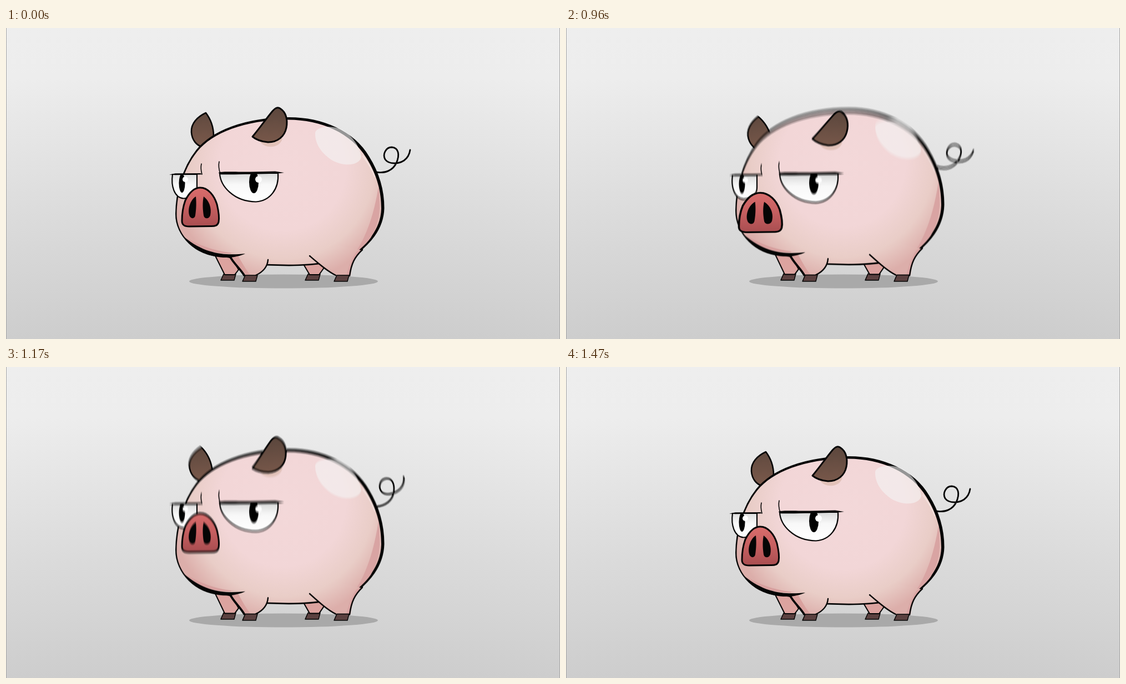
Recreate the animation shown at these times as an HTML page with a canvas. Size 998 by 561 pixels, loop 1800 ms.

```html
<!DOCTYPE html>
<html lang="en">
<head>
<meta charset="utf-8">
<title>Pig hop</title>
<style>
html, body { margin: 0; width: 100%; height: 100%; overflow: hidden; background: #ddd; }
canvas { display: block; width: 998px; height: 561px; }
</style>
</head>
<body>
<canvas id="stage" width="998" height="561"></canvas>
<script>
const W = 998, H = 561, LOOP = 1800, STEP = 30;
const SHUTTER = 15, SAMPLES = 7, GROUND = 457;
const out = document.getElementById('stage').getContext('2d');
const buffer = document.createElement('canvas');
buffer.width = W;
buffer.height = H;
const c = buffer.getContext('2d');

// Key times in ms; each track lists its value at those times (0 once it runs out).
const TIMES = [840, 900, 930, 960, 990, 1050, 1110, 1170, 1230, 1290, 1350, 1410, 1470];
const TRACKS = {
  body:      [0, 14, 7, -14, -33, -46, -36, -13, 8, 6],
  eyes:      [0, 14, 10, 1.5, -9, -28, -34, -17, 9, 5],
  snout:     [0, 6, 10, 10, 3, -24, -36, -24, 4, 4, -5, -3],
  snoutWide: [0, .1, .16, .17, .1],
  earY:      [0, 12, 10, 4, -6, -28, -33, -14, 16, 7],
  earTurn:   [0, -2, 0, 3.4, 7, 11, 8.7, -4, -12, -6],
  farY:      [0, 12, 11, 7, 0, -18, -23.5, -8, 14, 7],
  farTurn:   [0, -5, -9, -13, -18, -27, -26, -8, 6, 3],
  tail:      [0, 2, 6, 10, 10, 6, -10, -14, 4.5, 7]
};

const at = (track, i) => track[i] || 0;

function slope(track, i) {
  if (i < 1 || i >= TIMES.length - 1) return 0;
  const before = at(track, i) - at(track, i - 1);
  const after = at(track, i + 1) - at(track, i);
  return before && after ? (before + after) / (TIMES[i + 1] - TIMES[i - 1]) : 0;
}

function value(track, t) {
  const last = TIMES.length - 1;
  if (t <= TIMES[0] || t >= TIMES[last]) return 0;
  let i = 0;
  while (t >= TIMES[i + 1]) i++;
  const d = TIMES[i + 1] - TIMES[i], u = (t - TIMES[i]) / d, v = 1 - u;
  return v * v * (1 + 2 * u) * at(track, i) + u * u * (3 - 2 * u) * at(track, i + 1)
    + d * u * v * (v * slope(track, i) - u * slope(track, i + 1));
}

function poseAt(t) {
  const pose = {};
  for (const name in TRACKS) pose[name] = value(TRACKS[name], t);
  return pose;
}

function stops(gradient, list) {
  list.forEach(([p, color]) => gradient.addColorStop(p, color));
  return gradient;
}
const fade = (y0, y1, ...list) => stops(c.createLinearGradient(0, y0, 0, y1), list);

const sky = fade(0, H, [0, '#eeeeee'], [.16, '#ededed'], [.61, '#dbdbdb'], [1, '#cdcdcd']);
const skin = stops(c.createRadialGradient(500, 250, 0, 500, 250, 208),
  [[0, '#f3d8d9'], [.55, '#f2d6d7'], [.8, '#e9cdc7'], [1, '#dcaeaa']]);
const earFill = fade(145, 212, [0, '#5c473d'], [1, '#7a594b']);
const eyeFill = fade(262, 312, [0, '#d9d9d9'], [.4, '#f8f8f8'], [1, '#ffffff']);
const snoutFill = fade(287, 359, [0, '#d96d6c'], [.5, '#c65f60'], [1, '#a84d50']);

const path = d => new Path2D(d);
const BODY = path('M307.5 335C308 300 318 255 345 221C372 188 430 163.5 510 163.5' +
  'C570 163.5 625 188 652 233C672 265 679 295 679 325C678 365 650 390 632 405' +
  'C610 420 560 427 510 427L470 426C440 424 410 411 385 410C345 409 307 375 307.5 335Z');
const CHIN = path('M321 377C340 402 370 415 400 414L404 414C415 413 428 409 431 407C400 410 362 411 321 377Z');
const CHIN_SHADE = path('M326 379C350 402 380 410 425 406C390 407 355 395 326 379Z');
const SIDE_SHADE = path('M674 285C679 325 676 350 660 378C650 392 636 402 629 409C640 394 662 360 674 285Z');
const SHINE = path('M557 191C556 178 585 174 605 183C625 195 638 215 640 233C635 250 605 250 585 237C565 223 557 206 557 191Z');
const FRONT_LEG = path('M405 406C412 425 425 437 429 447L450 447C462 441 471 432 472 419L465 402Z');
const FRONT_SHADE = path('M406 413L418 411C426 425 433 437 440 445L429 445C422 433 411 425 406 413Z');
const HIND_LEG = path('M548 411C565 424 580 440 594 447L619 447C622 425 628 412 640 401L600 392Z');
const HIND_SHADE = path('M621 446C623 427 628 412 642 400L632 403C623 415 617 432 613 446Z');
const FAR_FRONT = path('M377 411L394 445L412 445L419 436L405 411Z');
const FAR_HIND = path('M534 423L547 445L564 445L574 431L562 420Z');
const TAIL = path('M667 260C684 263 697 256 703 244C710 228 707 216 695 215C684 215 678 228 683 237' +
  'C690 247 708 245 717 239C724 234 727 227 728 220');
const EAR = path('M444 196C455 183 470 162 480 150C486 143 491 142 495 146C504 152 508 165 505 180' +
  'C502 195 490 206 472 206C460 205 450 201 444 196Z');
const EAR_SHADE = path('M455 201C464 220 494 218 498 199Z');
const FAR_EAR = path('M360 153C345 160 333 172 334 188C335 202 343 211 352 214C362 207 371 200 374 195C374 178 369 165 360 153Z');
const EYE = path('M385 262C386 285 410 313 450 313.5C476 312 492 290 490 262Z');
const FAR_EYE = path('M300 264C297 285 303 306 320 307.5C335 307 344 298 344 287L344 264Z');
const BROW = path('M383 261C385 258 410 259.5 440 259.5L485 258.5L501 261L485 263C450 263 410 265 385 264Z');
const FAR_BROW = path('M294 264.5L305 262.3L351 262L352 264.3L305 265.3Z');
const CREASES = path('M384 241C382 250 384 257 386 263M352 245C350 254 352 259 353 264');
const SNOUT = path('M350 288C364 288 375 302 380 318C384 335 384 345 383 350C381 357 376 357.5 370 357.5' +
  'L330 358C321 358 317 355 317 348C317 335 319 322 323 311C330 297 338 288 350 288Z');
const NOSTRILS = path('M342 304C333 309 327 325 330 337C332 345 340 345 341 338C343 325 343 314 342 304Z' +
  'M356 304C366 311 371 325 368 338C366 345 357 345 356 338C354 325 354 314 356 304Z');

function fill(shape, color) {
  c.fillStyle = color;
  c.fill(shape);
}

function line(shape, width, color = '#050505') {
  c.strokeStyle = color;
  c.lineWidth = width;
  c.stroke(shape);
}

function oval(x, y, rx, ry, color) {
  c.fillStyle = color;
  c.beginPath();
  c.ellipse(x, y, rx, ry, 0, 0, Math.PI * 2);
  c.fill();
}

function group(draw) {
  c.save();
  draw();
  c.restore();
}

function scaleFrom(x, y, sx, sy) {
  c.translate(x, y);
  c.scale(sx, sy);
  c.translate(-x, -y);
}

function turn(x, y, degrees) {
  c.translate(x, y);
  c.rotate(degrees * Math.PI / 180);
  c.translate(-x, -y);
}

function hoof(x, y) {
  const shape = path(`M${x + 4} ${y}h22l-3 11h-24Z`);
  fill(shape, '#5b4140');
  line(shape, 1.5);
}

function leg(shape, color, width) {
  fill(shape, color);
  line(shape, width);
}

function drawEye(shape, brow, x, y, rx, ry, gx, gr) {
  fill(shape, eyeFill);
  group(() => {
    c.clip(shape);
    oval(x, y, rx, ry, '#000');
  });
  oval(gx, 273, gr, gr, '#fff');
  line(shape, 2.2);
  fill(brow, '#050505');
}

function drawBody() {
  hoof(388, 444);
  leg(FAR_FRONT, '#dca39f', 2);
  hoof(540, 444);
  leg(FAR_HIND, '#dca39f', 2);
  line(BODY, 5);
  fill(BODY, '#050505');
  group(() => {
    scaleFrom(307, 410, .992, .992);
    fill(BODY, skin);
    fill(SIDE_SHADE, '#d9a4a3');
    fill(CHIN_SHADE, '#d8a09f');
  });
  fill(SHINE, 'rgba(245,245,245,.6)');
  line(path('M643 231C652 243 659 254 664 268'), 2, 'rgba(255,255,255,.4)');
  fill(FRONT_LEG, skin);
  fill(FRONT_SHADE, '#d9a19e');
  fill(HIND_LEG, skin);
  fill(HIND_SHADE, '#d9a4a3');
  fill(CHIN, '#050505');
  line(path('M403 411C409 424 422 434 429 446'), 3.8);
  line(path('M450 446C463 440 471 431 472 418'), 2.4);
  line(path('M547 411C562 424 579 439 594 446'), 2.4);
  line(path('M619 447C622 425 628 413 642 400'), 2.4);
  hoof(427, 446);
  hoof(592, 446);
}

function drawScene(p) {
  const stretch = 1 - p.body / (GROUND - 164);
  const baseY = GROUND + (260 - GROUND) * stretch;
  c.lineCap = c.lineJoin = 'round';
  c.fillStyle = sky;
  c.fillRect(0, 0, W, H);
  c.fillStyle = '#a6a6a6';
  c.fillRect(0, 0, 1, H);
  c.fillRect(W - 1, 0, 1, H);
  oval(500, 457, 170, 12.5, '#a9a9a9');

  group(() => {
    c.translate(0, baseY - 260);
    turn(669, 260, p.tail);
    line(TAIL, 2.8);
  });
  group(() => {
    c.translate(Math.min(0, p.farTurn + 13) * .35, p.farY);
    turn(352, 213, p.farTurn);
    fill(FAR_EAR, earFill);
    line(FAR_EAR, 2.6);
  });
  group(() => {
    scaleFrom(0, GROUND, 1, stretch);
    drawBody();
  });
  group(() => {
    c.translate(0, p.earY);
    turn(444, 196, p.earTurn);
    fill(EAR_SHADE, '#e2c2b9');
    fill(EAR, earFill);
    line(EAR, 3);
  });
  group(() => {
    c.translate(0, p.eyes);
    drawEye(FAR_EYE, FAR_BROW, 317, 280, 5.5, 17, 323, 5);
    drawEye(EYE, BROW, 446.5, 278, 8.5, 20, 455, 6);
    line(CREASES, 1.6);
  });
  group(() => {
    c.translate(0, p.snout);
    scaleFrom(350, 323, 1 + p.snoutWide, 1 + p.snoutWide * .1);
    fill(SNOUT, snoutFill);
    line(SNOUT, 3);
    fill(NOSTRILS, '#050505');
  });
}

// Averages several poses inside the shutter time to give motion blur.
function render(t) {
  const moving = t >= TIMES[0] && t < TIMES[TIMES.length - 1];
  const count = moving ? SAMPLES : 1;
  for (let i = 0; i < count; i++) {
    const shift = moving ? (i / (count - 1) - .5) * SHUTTER : 0;
    drawScene(poseAt(t + shift));
    out.globalAlpha = 1 / (i + 1);
    out.drawImage(buffer, 0, 0);
  }
}

const start = performance.now();
let shown = -1;

function tick() {
  const step = Math.floor((performance.now() - start) % LOOP / STEP);
  if (step !== shown) {
    shown = step;
    render(step * STEP);
  }
  requestAnimationFrame(tick);
}
tick();
</script>
</body>
</html>
```
